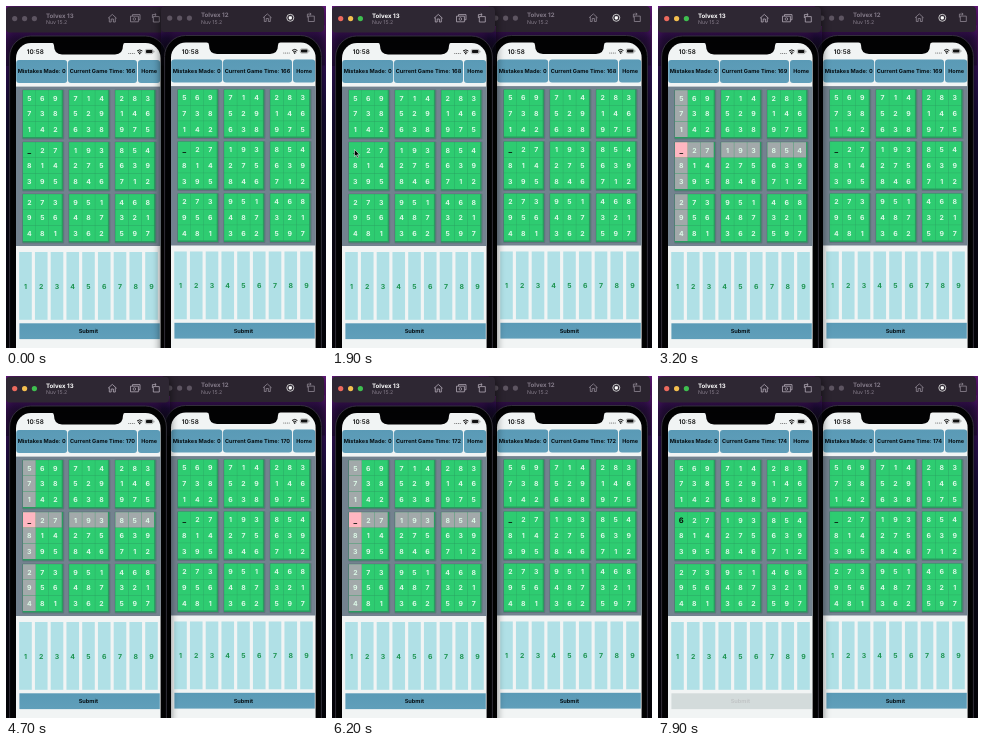
An HTML page for the animation above (8 s loop, 320 px wide and 342 px high).

```html
<!DOCTYPE html>
<html lang="en">
<head>
<meta charset="utf-8">
<title>Sudoku on two phones</title>
<style>
  html, body { margin: 0; height: 100%; overflow: hidden; background: #07050d; }
  svg { display: block; width: 100vw; height: 100vh; }
  text {
    font-family: Inter, "Liberation Sans", sans-serif; font-weight: 700;
    text-anchor: middle; text-rendering: geometricPrecision;
  }
  .start { text-anchor: start; }
  .thin { font-weight: 400; }
  .semi { font-weight: 600; }
</style>
</head>
<body>
<svg id="stage" viewBox="0 0 320 342">
  <defs>
    <linearGradient id="sky" x1="0" y1="0" x2="0" y2="1">
      <stop offset="0" stop-color="#6c1a86"/>
      <stop offset=".1" stop-color="#541668"/>
      <stop offset=".2" stop-color="#351363"/>
      <stop offset=".32" stop-color="#1a0f40"/>
      <stop offset=".55" stop-color="#0e0b22"/>
      <stop offset="1" stop-color="#06050c"/>
    </linearGradient>
    <linearGradient id="blue" x1="0" y1="0" x2="0" y2="1">
      <stop offset="0" stop-color="#5a9ab6"/>
      <stop offset="1" stop-color="#609fba"/>
    </linearGradient>
    <filter id="soft" x="-20%" y="-20%" width="140%" height="140%">
      <feGaussianBlur stdDeviation="4.5"/>
    </filter>
  </defs>
  <rect width="320" height="342" fill="url(#sky)"/>
</svg>
<script>
const LOOP = 8000;
const ROWS = ['569714283', '738529146', '142638975', '_27193854', '814275639',
  '395846712', '273951468', '956487321', '481362597'];
const GREEN = '#2ecc71', GREY = '#a2a9aa', PINK = [255, 182, 193], PRESSED = [158, 172, 171];
const stage = document.getElementById('stage');

function add(parent, tag, attrs, text) {
  const node = document.createElementNS('http://www.w3.org/2000/svg', tag);
  set(node, attrs);
  if (text !== undefined) node.textContent = text;
  parent.append(node);
  return node;
}
function set(node, attrs) {
  for (const k in attrs) node.setAttribute(k, attrs[k]);
}
const box = (p, x, y, width, height, fill, rx = 0, more = {}) =>
  add(p, 'rect', { x, y, width, height, fill, rx, ...more });
const label = (p, x, y, size, fill, str, cls = '') =>
  add(p, 'text', { x, y, 'font-size': size, fill, class: cls }, str);
const line = (p, d, stroke, width = 0.8) =>
  add(p, 'path', { d, fill: 'none', stroke, 'stroke-width': width, 'stroke-linejoin': 'round' });

const cellX = c => 17 + 13 * c + 7.2 * Math.floor(c / 3);
const cellY = r => 84.2 + 15.7 * r + 4.9 * Math.floor(r / 3);

function titleBar(win, name, recording) {
  const bar = box(win, 0, 0.8, 163, 25.6, '#2c2530', 4);
  const lights = [8.7, 18.6, 28.4].map(cx => add(win, 'circle', { cx, cy: 12.6, r: 2.6 }));
  const title = label(win, 40, 11.5, 6.1, '#fff', name, 'start');
  label(win, 40, 18, 5.2, '#877e8c', 'Nuv 15.2', 'start thin');
  const icons = add(win, 'g', {});
  line(icons, 'M102 12.3L106.3 8.4L110.6 12.3M103.3 11.5V16H105.2V13H107.4V16H109.3V11.5', '#b9b0bd');
  if (recording) {
    add(win, 'circle', { cx: 129.3, cy: 12.3, r: 3.5, fill: 'none', stroke: '#eee', 'stroke-width': 0.8 });
    box(win, 127.7, 10.7, 3.2, 3.2, '#fff', 0.8);
  } else {
    line(icons, 'M126.5 10V8.6H134V13.8H132.6M124.5 10.2H132.4V15.8H124.5Z', '#b9b0bd');
    add(icons, 'circle', { cx: 128.4, cy: 13, r: 1.3, fill: 'none', stroke: '#b9b0bd', 'stroke-width': 0.7 });
  }
  line(icons, 'M147.3 10.6H153.3V16H147.3ZM146.4 12V8.6H150M148.8 7.3L150.2 8.6L148.8 9.9', '#b9b0bd');
  return { bar, lights, title, icons };
}

function statusBar(win) {
  label(win, 29.3, 48.4, 6.4, '#111', '10:58', 'semi');
  for (let i = 0; i < 4; i++) add(win, 'circle', { cx: 122.8 + 1.8 * i, cy: 47.4, r: 0.5, fill: '#555' });
  line(win, 'M131 45Q133.7 42.7 136.4 45M132 46.5Q133.7 45 135.4 46.5', '#111', 1);
  add(win, 'circle', { cx: 133.7, cy: 47.6, r: 0.8, fill: '#111' });
  box(win, 139.3, 43.4, 7.8, 4.3, 'none', 1.3, { stroke: '#777', 'stroke-width': 0.5 });
  box(win, 140, 44.1, 6.4, 2.9, '#111', 0.7);
  box(win, 147.7, 44.8, 0.6, 1.5, '#777');
}

function board(win) {
  box(win, 10, 80.6, 144.6, 159.4, '#73828f');
  for (let i = 0; i < 9; i++) {
    const x = cellX(i % 3 * 3), y = cellY(Math.floor(i / 3) * 3);
    box(win, x - 0.8, y - 0.6, 42, 50, '#4f6068', 1, { opacity: 0.45 });
    box(win, x - 0.3, y - 0.3, 40.4, 48.7, '#2a9a60', 0.5);
  }
  return ROWS.map((row, r) => [...row].map((ch, c) => {
    const x = cellX(c), y = cellY(r), blank = ch === '_';
    const rect = box(win, x, y, 12.7, 15.4, GREEN);
    const digit = label(win, x + 6.3, y + 10.5, blank ? 7.6 : 6.9, blank ? '#0a120c' : '#dcf9e7', ch);
    return { rect, digit };
  }));
}

function phone(dx, dy, name, recording) {
  const win = add(stage, 'g', { transform: `translate(${dx} ${dy})` });
  box(win, 0, 0, 164, 380, '#000', 8, { opacity: 0.6, filter: 'url(#soft)' });
  box(win, 0, 20, 164, 40, 'url(#sky)', 0, { opacity: 0.35 });
  const chrome = titleBar(win, name, recording);
  box(win, 3.6, 30, 156.8, 340, '#020203', 21, { stroke: '#37343f', 'stroke-width': 0.9 });
  box(win, 10, 37, 144.6, 330, '#f1f4f4', 15);
  add(win, 'path', { d: 'M45.5 36.5Q48 37 48 39.5Q48 48.4 56 48.4H109Q117 48.4 117 39.5Q117 37 119.5 36.5Z', fill: '#020203' });
  statusBar(win);

  const button = (x, w, str) => {
    box(win, x, 54, w, 23, 'url(#blue)', 3);
    return label(win, x + w / 2, 67.4, 5.55, '#071015', str);
  };
  button(10.2, 51, 'Mistakes Made: 0');
  const timer = button(62, 69, '');
  button(132, 22.2, 'Home');

  const cells = board(win);

  const keys = [];
  for (let n = 0; n < 9; n++) {
    const x = 13.2 + 15.75 * n, key = add(win, 'g', {});
    box(key, x, 246, 12.6, 67.8, '#b0e0e6');
    label(key, x + 6.2, 282.5, 6.9, '#1d9450', n + 1);
    keys.push(key);
  }

  const submit = add(win, 'g', {});
  const submitRect = box(submit, 13.4, 317.3, 140.4, 15.8, 'url(#blue)');
  label(submit, 82.3, 327.2, 5.6, '#071015', 'Submit');
  return { win, ...chrome, timer, cells, keys, submit, submitRect };
}

const left = phone(0, 0, 'Tolvex 13', false);
const right = phone(155, -0.5, 'Tolvex 12', true);
const cursor = add(stage, 'path', {
  d: 'M0 0V7L1.6 5.6L2.7 8.2L3.9 7.7L2.8 5.2H5Z', fill: '#000', stroke: '#fff', 'stroke-width': 0.5
});

const ramp = (t, a, b) => Math.min(1, Math.max(0, (t - a) / (b - a)));
const mix = (a, b, k) => `rgb(${a.map((v, i) => Math.round(v + (b[i] - v) * k))})`;

function paintChrome(p, active) {
  p.bar.setAttribute('fill', active ? '#2e2733' : '#2b242f');
  p.title.setAttribute('fill', active ? '#fff' : '#847b89');
  p.icons.setAttribute('opacity', active ? 0.95 : 0.7);
  p.lights.forEach((dot, i) =>
    dot.setAttribute('fill', active ? ['#ed6a5e', '#f4bf4f', '#3fbf50'][i] : '#5d5461'));
}

let front = null;
function render(t) {
  const active = t >= 1800;
  if (front !== active) {
    front = active;
    const order = active ? [right, left] : [left, right];
    stage.append(order[0].win, order[1].win, cursor);
    paintChrome(left, active);
    paintChrome(right, false);
  }

  const time = `Current Game Time: ${166 + Math.floor((t + 200) / 1000)}`;
  left.timer.textContent = right.timer.textContent = time;

  // Tapping the blank cell highlights its row and column until a digit is entered.
  const selected = t >= 2000 && t < 7100;
  for (let i = 0; i < 9; i++) {
    const fill = selected ? GREY : GREEN;
    left.cells[3][i].rect.setAttribute('fill', fill);
    left.cells[i][0].rect.setAttribute('fill', fill);
  }
  const blank = left.cells[3][0];
  if (selected) blank.rect.setAttribute('fill', mix(PRESSED, PINK, ramp(t, 2150, 2400)));
  blank.digit.textContent = t >= 7100 ? '6' : '_';

  left.keys[5].setAttribute('opacity', 1 - 0.62 * (ramp(t, 6700, 6850) - ramp(t, 7120, 7300)));

  const press = ramp(t, 7650, 7850);
  left.submit.setAttribute('opacity', 1 - 0.8 * press);
  left.submitRect.setAttribute('fill', press ? mix([93, 157, 184], [98, 122, 122], press) : 'url(#blue)');

  const onCell = t >= 1900 && t < 2300, onKey = t >= 6700 && t < 7250;
  set(cursor, {
    visibility: onCell || onKey ? 'visible' : 'hidden',
    transform: onCell ? 'translate(22.5 143.5)' : 'translate(96.8 276.3)'
  });
}

const start = performance.now();
function tick() {
  render((performance.now() - start) % LOOP);
  requestAnimationFrame(tick);
}
tick();
</script>
</body>
</html>
```
